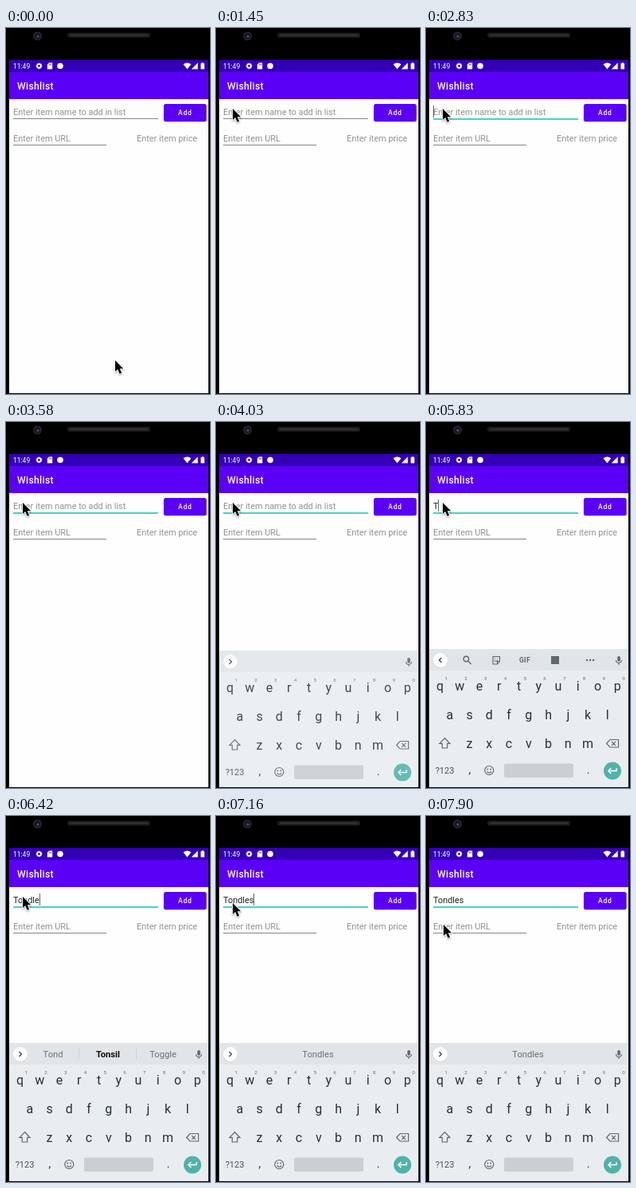
Write an HTML page with a canvas that moves like this. It is 256x458 px and loops after 8000 ms.

```html
<!DOCTYPE html>
<html lang="en">
<head>
<meta charset="utf-8">
<title>Wishlist</title>
<style>
html, body { margin: 0; width: 100%; height: 100%; overflow: hidden; background: #000; }
canvas { display: block; width: 256px; height: 458px; }
</style>
</head>
<body>
<canvas></canvas>
<script>
const LOOP = 8000;
const INK = '#263238', ICON = '#5f686d', HINT = '#929292', TEAL = '#42d6c9';

// Each track lists [start time, value]; values change without blending.
const pointer = [
  [0, [137, 416]], [270, [127, 393]], [400, [99, 292]], [550, [53, 166]], [700, [28, 109]],
  [1000, [25, 101]], [1300, [20, 101]], [1450, [21, 101]],
  [7160, [21, 109]], [7310, [21, 128]], [7460, [20, 146]], [7600, [21, 142]],
  [7750, [22, 138]], [7900, [22, 136]]
];
const caret = [[0, false], [2830, true], [3580, false], [4180, true], [5080, false], [5830, true], [7460, false]];
const typed = [[0, ''], [5830, 'T'], [5980, 'Ton'], [6120, 'Tond'], [6270, 'Tondl'], [6420, 'Tondle'], [6720, 'Tondles']];
const strip = [
  [0, []], [4180, 'tools'], [5980, ['T', 'The', 'Though']], [6120, ['Ton', 'Tone', 'Tons']],
  [6270, ['Tond', 'Tonsil', 'Toggle']], [6860, ['', 'Tondles', '']]
];

const canvas = document.querySelector('canvas');
const ctx = canvas.getContext('2d');
const ratio = window.devicePixelRatio || 1;
canvas.width = 256 * ratio;
canvas.height = 458 * ratio;

const valueAt = (track, t) => track.filter(step => step[0] <= t).pop()[1];

function rect(x, y, w, h, color, radius = 0) {
  ctx.fillStyle = color;
  ctx.beginPath();
  ctx.roundRect(x, y, w, h, radius);
  ctx.fill();
}

function circle(x, y, r, color) {
  ctx.fillStyle = color;
  ctx.beginPath();
  ctx.arc(x, y, r, 0, 7);
  ctx.fill();
}

function fill(d, color) {
  ctx.fillStyle = color;
  ctx.fill(new Path2D(d));
}

function line(d, color, width = 1.2) {
  ctx.strokeStyle = color;
  ctx.lineWidth = width;
  ctx.stroke(new Path2D(d));
}

function text(str, x, y, size, color, { weight = 400, align = 'left', spacing = 0 } = {}) {
  ctx.font = `${weight} ${size}px Roboto, sans-serif`;
  ctx.letterSpacing = spacing + 'px';
  ctx.textAlign = align;
  ctx.fillStyle = color;
  ctx.fillText(str, x, y);
  return ctx.measureText(str).width;
}

function drawPhone() {
  rect(0, 0, 256, 458, '#000');
  circle(39.5, 10, 5.5, '#25252a');
  circle(39.5, 10, 3.5, '#14141c');
  circle(40, 10.5, 1.6, '#4b4790');
  rect(77, 6, 104, 6, '#1d1d1d', 3);
  rect(80, 8, 98, 2, '#303030', 1);
  rect(4, 40, 250, 417, '#fefefe');
}

function drawBars() {
  rect(4, 40, 250, 15, '#3300b5');
  rect(4, 55, 250, 34, '#5b00f6');
  text('11:49', 9, 51, 8.5, '#fff');

  for (let i = 0; i < 8; i++) {
    const a = i * Math.PI / 4, x = Math.cos(a), y = Math.sin(a);
    line(`M${41.5 + 2 * x} ${47.5 + 2 * y}L${41.5 + 3.8 * x} ${47.5 + 3.8 * y}`, '#fff', 1.6);
  }
  line('M39.3 47.5a2.2 2.2 0 1 0 4.4 0a2.2 2.2 0 1 0 -4.4 0', '#fff', 1.6);
  fill('M54 43.5h4.2v8h-6.4v-5.8z', '#fff');
  line('M54.3 45v1.7M55.6 45v1.7M56.9 45v1.7', '#3300b5', .6);
  circle(68, 47.5, 3.8, '#fff');

  fill('M222.5 45.4q4.9 -3.8 9.8 0l-4.9 6z', '#fff');
  fill('M240.7 43.5v8h-8z', '#fff');
  fill('M245.7 43.3h2v.9h1.3v7.4h-4.6v-7.4h1.3z', '#fff');

  text('Wishlist', 14, 76.5, 12.2, '#fff', { weight: 500, spacing: .3 });
}

function drawForm(t) {
  const name = valueAt(typed, t);
  const nameWidth = text(name, 9, 109, 10.9, '#222');
  if (!name) text('Enter item name to add in list', 9, 109, 10.9, HINT);
  if (valueAt(caret, t)) rect(9 + Math.round(nameWidth), 97, 1, 15, '#4a6f6c');
  if (t < 2830) rect(9, 113, 182, 1, '#858585');
  else rect(9, 113, 182, 2, TEAL);

  text('Enter item URL', 9, 142, 10.9, HINT);
  rect(9, 146, 117, 1, '#858585');
  text('Enter item price', 164, 142, 10.9, HINT);

  rect(197.5, 95.5, 54.5, 22.5, '#d5d0e2', 3);
  rect(198, 95, 53.5, 22, '#5b00f6', 2.5);
  text('Add', 216, 109, 8.5, '#fff', { weight: 500, spacing: .76 });
}

function drawTools() {
  line('M47.2 296.5a3.2 3.2 0 1 0 6.4 0a3.2 3.2 0 1 0 -6.4 0M52.7 298.9l4 4', ICON, 1.4);
  line('M84 293.5h8.5v6l-3 3.5h-5.5zM92.5 299.5h-3v3.5M85.8 298q2 3 4 0M86 296h1M89.5 296h1', ICON, 1.1);
  text('GIF', 124, 301.3, 8.5, ICON, { weight: 700, align: 'center', spacing: .4 });
  rect(157, 293, 10, 10, ICON);
  for (const x of [202, 206, 210]) circle(x, 298, 1.2, ICON);
}

function drawSuggestions(words) {
  words.forEach((word, i) => {
    const best = i === 1 && words[0];
    text(word, 59 + 69 * i, 302.3, 11.2, best ? '#111' : '#697176', { weight: best ? 700 : 400, align: 'center' });
  });
  if (words[0]) for (const x of [91, 163]) rect(x, 291, 1, 14, '#cfd4d7');
}

function drawStrip(content) {
  const tools = content === 'tools';
  rect(4, 284, 250, 27, '#e1e5e8');
  circle(18, 298.5, 9.3, '#d3d7da');
  circle(18, 298, 9, '#fff');
  line(tools ? 'M19.5 295l-3 3l3 3' : 'M16.5 295l3 3l-3 3', '#3d464b', 1.3);
  if (tools) drawTools();
  else drawSuggestions(content);
  rect(240.2, 293, 3.6, 6.8, ICON, 1.8);
  line('M238.5 298a3.5 3.5 0 0 0 7 0M242 301.5v2.5', ICON, 1.1);
}

function drawKeys(caps) {
  const rows = [['qwertyuiop', 17.5, 335.5], ['asdfghjkl', 29.8, 371.5], ['zxcvbnm', 54.5, 407.5]];
  for (const [letters, left, y] of rows) {
    [...letters].forEach((letter, i) => {
      const key = caps ? letter.toUpperCase() : letter;
      text(key, left + 24.75 * i, y, 16, INK, { align: 'center' });
    });
  }
  for (let i = 0; i < 10; i++) {
    text((i + 1) % 10, 25.3 + 24.75 * i, 322.5, 6.2, '#667075', { align: 'center' });
  }

  const shift = 'M23.5 395.5l6.5 6.8h-3.3v5.7h-6.4v-5.7h-3.3z';
  if (caps) fill(shift, '#465158');
  else line(shift, ICON);
  line('M231 397.5h10.5v9.5h-10.5l-4.5 -4.75zM233 399.8l5 5M238 399.8l-5 5', ICON);

  text('?123', 23.5, 440, 11, '#465158', { align: 'center' });
  text(',', 55, 440, 14, INK, { align: 'center' });
  text('.', 203.5, 440, 14, INK, { align: 'center' });
  line('M73.8 436a5.5 5.5 0 1 0 11 0a5.5 5.5 0 1 0 -11 0M76.5 437.3q2.8 3.4 5.6 0', ICON);
  circle(77.4, 434.5, .9, ICON);
  circle(81.2, 434.5, .9, ICON);
  rect(98, 427.5, 87, 17.5, '#cbcfd2', 2);
  circle(234, 436.5, 11, '#4fb3a9');
  line('M239 433v3.5h-10M232.3 433l-3.5 3.5l3.5 3.5', '#fff', 1.4);
}

function drawKeyboard(t) {
  if (t < 4030) return;
  const arriving = t < 4180;
  ctx.save();
  ctx.beginPath();
  ctx.rect(4, 40, 250, 417);
  ctx.clip();
  if (arriving) {
    ctx.globalAlpha = .87;
    ctx.translate(0, 2);
  }
  rect(4, 311, 250, 146, '#e9edf0');
  drawStrip(valueAt(strip, t));
  drawKeys(t >= 4630 && t < 5080);
  ctx.restore();
}

function drawPointer(t) {
  ctx.save();
  ctx.translate(...valueAt(pointer, t));
  ctx.lineJoin = 'round';
  const arrow = 'M0 0v14l3.2 -3l2.4 5.8l2.6 -1.1l-2.4 -5.5h4.4z';
  ctx.shadowColor = 'rgba(0,0,0,.35)';
  ctx.shadowBlur = 2 * ratio;
  ctx.shadowOffsetY = ratio;
  line(arrow, '#fff', 2);
  ctx.shadowColor = 'transparent';
  fill(arrow, '#000');
  ctx.restore();
}

function draw() {
  const t = performance.now() % LOOP;
  ctx.setTransform(ratio, 0, 0, ratio, 0, 0);
  drawPhone();
  drawBars();
  drawForm(t);
  drawKeyboard(t);
  drawPointer(t);
  requestAnimationFrame(draw);
}
draw();
</script>
</body>
</html>
```
